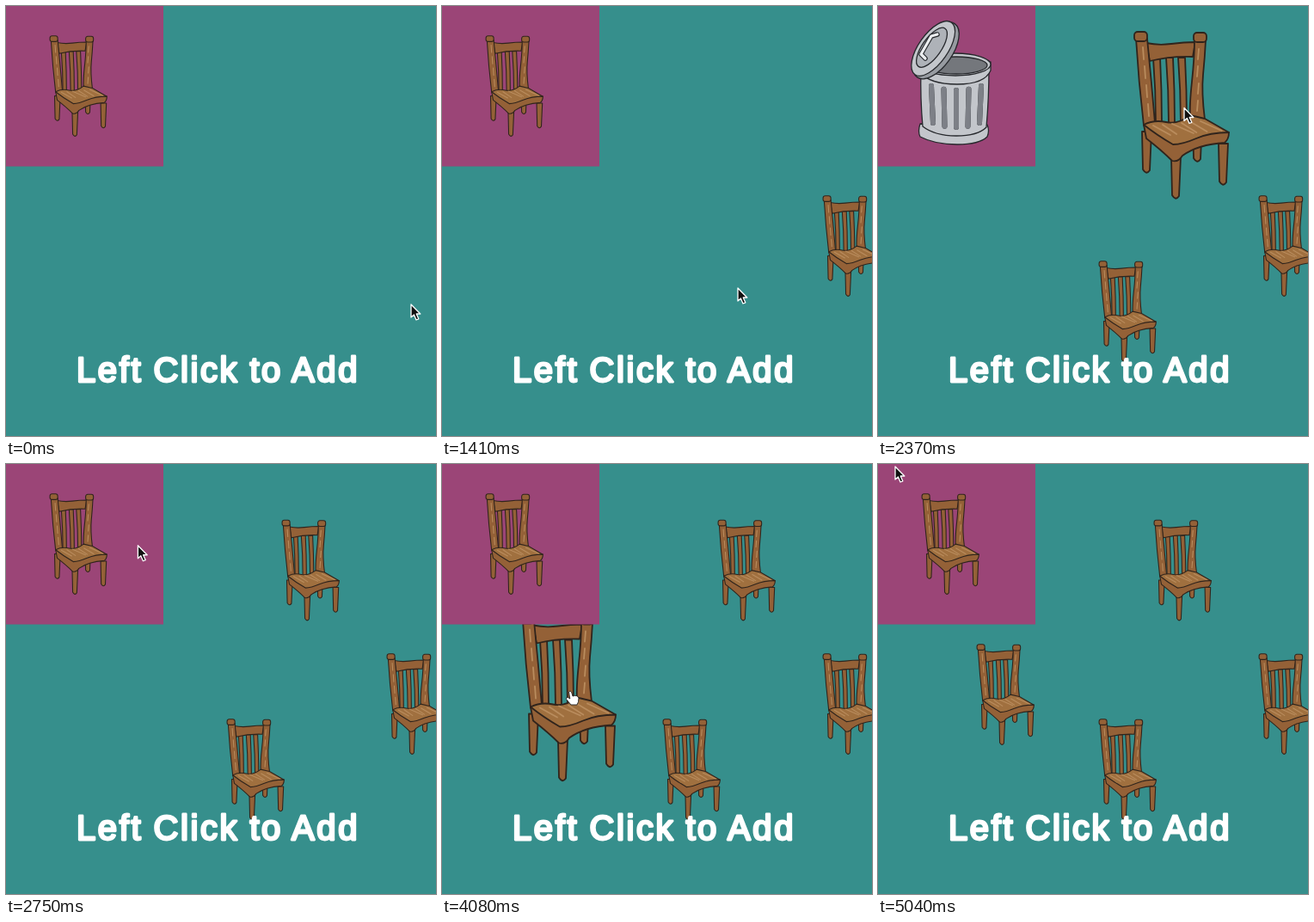
Animation, 500 px wide and 500 px high, one loop 5.14 s. Source, as an HTML page:

```html
<!DOCTYPE html>
<html lang="en">
<head>
<meta charset="utf-8">
<title>Left Click to Add</title>
<style>
  html, body { margin: 0; width: 100%; height: 100%; overflow: hidden; background: #368f8c; }
  svg { display: block; width: 100%; height: 100%; }
  text { font: 40px "Liberation Sans", Arial, sans-serif; letter-spacing: 2.6px; word-spacing: -1.4px; }
</style>
</head>
<body>
<svg viewBox="0 0 500 500">
  <defs>
    <path id="leg" d="M0 0 1 44Q5 51 9 45L11 0Z"/>
    <path id="slat" d="M0 60Q3 98 3 137H10Q10 98 8 60Z"/>
    <rect id="knob" width="15" height="11" rx="4"/>

    <!-- Drawn at hover size, with its pivot moved to the origin -->
    <g id="chair" transform="translate(-356 -118.5)" fill="#946137" stroke="#30241c" stroke-width="1.8" stroke-linejoin="round" stroke-linecap="round">
      <use href="#leg" x="366" y="133"/>
      <use href="#slat" x="320"/>
      <use href="#slat" x="335"/>
      <use href="#slat" x="349"/>
      <path d="M312 43Q326 46 341 44T369 42L366 59Q340 58 316 64Z"/>
      <path d="M300 38Q303 88 309 139L322 136Q318 88 313 38Z"/>
      <path d="M368 40Q368 60 365 88T363 130L380 132Q376 100 378 80T381 40Z"/>
      <use href="#knob" x="298" y="30"/>
      <use href="#knob" x="367" y="31"/>
      <use href="#leg" x="307" y="146"/>
      <use href="#leg" x="396" y="160"/>
      <use href="#leg" x="341" y="176"/>
      <path d="M309 138 312 154Q330 168 342 180Q349 182 354 174Q372 161 403 159Q408 155 408 147Z"/>
      <path fill="#a0703f" d="M309 138Q321 132 335 135T363 127L380 131 408 147Q386 147 370 154T343 161Q324 150 309 138Z"/>
      <path id="grain" fill="none" stroke="#b98c5d" stroke-width="1.8"/>
    </g>

    <g id="trash" fill="#c3c6cb" stroke="#26282c" stroke-width="1.3" stroke-linejoin="round" stroke-linecap="round">
      <path d="M49 137Q46 146 49 152Q66 161 92 161T127 152Q130 145 127 138Z"/>
      <path d="M50 72Q49 108 52 140Q66 151 91 151T126 141Q129 108 129 70Z"/>
      <path id="slots" stroke-width="6"/>
      <use href="#slots" stroke="#7d8087" style="stroke-width: 4"/>
      <path d="M49 68V77Q60 91 92 91T131 75V65Z"/>
      <ellipse cx="90" cy="68" rx="41" ry="13"/>
      <ellipse cx="91" cy="69" rx="36" ry="10" fill="#74777c"/>
      <g transform="translate(65 50) rotate(-55)">
        <ellipse cy="3" rx="38" ry="19" fill="#979ba1"/>
        <ellipse cy="-1" rx="37" ry="17"/>
        <ellipse cy="-3" rx="27" ry="11" fill="#aeb2b8"/>
      </g>
      <path fill="none" stroke-width="5.5" d="M55 61 50 56 62 35 69 33"/>
      <path fill="none" stroke="#eceef0" stroke-width="3.2" d="M55 61 50 56 62 35 69 33"/>
    </g>
  </defs>

  <g id="placed"></g>
  <path fill="#9b4577" d="M0 0H183V186.5H0Z"/>
  <use id="sample" href="#chair" transform="translate(86 88) scale(.602)"/>
  <use id="bin" href="#trash"/>
  <text x="82" y="436.5" fill="#fff" stroke="#fff" stroke-width="2.8" stroke-linejoin="round">Left Click to Add</text>
  <g id="cursor" stroke-linejoin="round">
    <path id="arrow" fill="#111" stroke="#fff" stroke-width="1.3" d="M0 0V15L3.4 12 6 18 8.8 16.8 6.2 11H10.8Z"/>
    <path id="hand" fill="#fff" stroke="#222" stroke-width=".9" d="M-1.5 1Q0-1 1.5 1L3 6Q8 4 10 8Q10 13 8 16H1L-4.5 9.5Q-5 7 -2.5 7.5L-.2 9Z"/>
  </g>
</svg>
<script>
const LOOP = 5140, START = 790, STEP = 540 / 13, LAST = 102;
const SMALL = 0.602, PANEL = { x: 70, y: 85 };

// Where the pointer is at each step; `carry` is the chair taken along to the next stop
const stops = [
  { step: -1, x: 471, y: 347 },
  { step: 6, ...PANEL, carry: 0 },
  { step: 12, x: 478, y: 274 },
  { step: 15, x: 344, y: 328 },
  { step: 19, ...PANEL, carry: 1 },
  { step: 25, x: 292, y: 350 },
  { step: 28, x: 305, y: 312 },
  { step: 34, ...PANEL, carry: 2 },
  { step: 38, x: 356, y: 118.5 },
  { step: 52, ...PANEL, carry: 3 },
  { step: 59, x: 548, y: 110 },
  { step: 66, x: 548, y: 110, carry: 3 },
  { step: 78, x: 150, y: 263 },
  { step: 79, x: 149, y: 264 },
  { step: LAST, x: 20, y: 3 }
];

const $ = id => document.getElementById(id);
const show = (el, on) => el.style.display = on ? "" : "none";
const lines = (count, line) => Array.from({ length: count }, (_, i) => line(i)).join("");

// Wood streaks: along the seat, then down both posts
$("grain").setAttribute("d",
  lines(6, i => `M${320 + 11 * i} ${139 - i}l${20 + 5 * Math.sin(i * 4)} 11`) +
  lines(4, i => `M${308 + 2 * i} ${48 + 22 * i}l1 14M${373 - i % 2} ${50 + 20 * i}l-1 12`));

$("slots").setAttribute("d", lines(5, i => {
  const u = i / 2 - 1, rise = 5 * u * u;
  return `M${91 + 29 * u} ${98 - rise}L${91 + 27 * u} ${141 - rise}`;
}));

const sprites = [0, 1, 2, 3].map(() => {
  const use = document.createElementNS("http://www.w3.org/2000/svg", "use");
  use.setAttribute("href", "#chair");
  return $("placed").appendChild(use);
});

function pointer(step) {
  const i = Math.max(1, stops.findIndex(stop => stop.step >= step));
  const a = stops[i - 1], b = stops[i];
  const u = (step - a.step) / (b.step - a.step), k = u * u * (3 - 2 * u);
  return { x: a.x + (b.x - a.x) * k, y: a.y + (b.y - a.y) * k, carry: a.carry };
}

function draw(now) {
  const t = now % LOOP;
  const step = Math.max(-1, Math.min(LAST, Math.floor((t - START + 4) / STEP)));
  const { x, y, carry } = pointer(step);
  const carrying = carry !== undefined;
  let hovering = false;

  sprites.forEach((sprite, i) => {
    const taken = stops.findLastIndex(stop => stop.carry === i && stop.step < step);
    show(sprite, taken >= 0);
    if (taken < 0) return;
    const at = pointer(Math.min(step, stops[taken + 1].step));
    const hovered = !carrying && Math.abs(x - at.x) < 35 && Math.abs(y - at.y) < 58;
    hovering ||= hovered;
    const scale = hovered || carry === i ? 1 : SMALL;
    sprite.setAttribute("transform", `translate(${at.x} ${at.y}) scale(${scale})`);
  });

  show($("bin"), carrying);
  show($("sample"), !carrying);
  show($("hand"), hovering);
  show($("arrow"), !hovering);
  $("cursor").setAttribute("transform", `translate(${x} ${y})`);
  requestAnimationFrame(draw);
}
requestAnimationFrame(draw);
</script>
</body>
</html>
```
